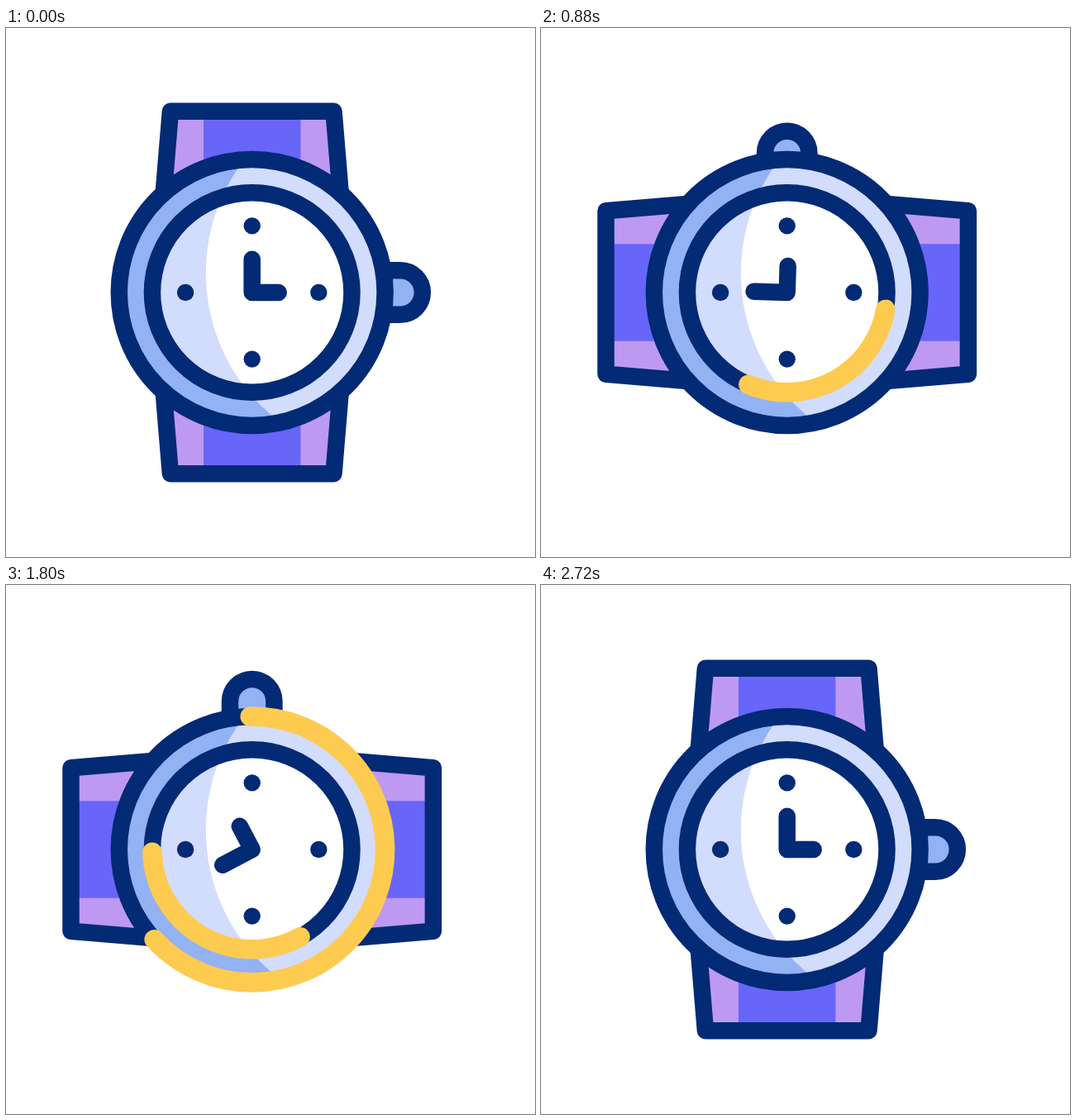
An HTML page with a canvas that plays this animation: 640 by 640 pixels, repeating every 3000 ms.

```html
<!DOCTYPE html>
<html>
<head>
<meta charset="utf-8">
<title>Watch</title>
<style>
html, body { margin: 0; height: 100%; overflow: hidden; background: #fff; }
canvas { display: block; width: 100%; height: 100%; }
</style>
</head>
<body>
<canvas width="640" height="640"></canvas>
<script>
const ctx = document.querySelector('canvas').getContext('2d');
const LOOP = 3000, LINE = 20.5;
const NAVY = '#032a75', BLUE = '#93b2f4', PALE = '#d2dcfd';
const VIOLET = '#bd99f2', INDIGO = '#6865f9', YELLOW = '#fecb51';
const RAD = Math.PI / 180;

// Sweep of one ring highlight: time, tail and head in degrees past 3 o'clock
const SWEEP = [
  [700, 0, 0], [880, 9.5, 112], [1260, 145.7, 428.4],
  [1560, 300, 508], [1780, 409.2, 537.2], [2020, 540, 540]
];

const clamp = u => Math.min(1, Math.max(0, u));
const smooth = (t, from, to) => {
  const u = clamp((t - from) / (to - from));
  return u * u * (3 - 2 * u);
};

// cubic-bezier(.38, 0, .19, 1)
function swing(t, from) {
  const u = clamp((t - from) / 600);
  let lo = 0, hi = 1;
  for (let i = 0; i < 24; i++) {
    const s = (lo + hi) / 2, q = 1 - s;
    if (1.14 * s * q * q + 0.57 * s * s * q + s * s * s < u) lo = s; else hi = s;
  }
  return lo * lo * (3 - 2 * lo);
}

// Cubic through the sweep points, at rest at both ends
function sweepAt(t, col) {
  const slope = i => {
    const a = SWEEP[i - 1], b = SWEEP[i + 1];
    return a && b ? (b[col] - a[col]) / (b[0] - a[0]) : 0;
  };
  const i = SWEEP.findIndex(p => p[0] > t) - 1;
  const [a, b] = [SWEEP[i], SWEEP[i + 1]];
  const d = b[0] - a[0], u = (t - a[0]) / d, q = 1 - u;
  return a[col] * q * q * (1 + 2 * u) + b[col] * u * u * (3 - 2 * u)
    + d * u * q * (q * slope(i) - u * slope(i + 1));
}

function circle(x, y, r) {
  ctx.beginPath();
  ctx.arc(x, y, r, 0, 7);
}

function fill(color) {
  ctx.fillStyle = color;
  ctx.fill();
}

function stroke(color = NAVY, width = LINE) {
  ctx.strokeStyle = color;
  ctx.lineWidth = width;
  ctx.stroke();
}

function strap(side) {
  ctx.save();
  ctx.scale(1, side);
  ctx.beginPath();
  ctx.moveTo(-111.2, -70);
  ctx.lineTo(-98.8, -219.2);
  ctx.lineTo(98.8, -219.2);
  ctx.lineTo(111.2, -70);
  fill(VIOLET);
  ctx.fillStyle = INDIGO;
  ctx.fillRect(-58.7, -219, 117.4, 149);
  stroke();
  ctx.restore();
}

function crown(press) {
  const x = 179.4 - press;
  ctx.beginPath();
  ctx.moveTo(130, -26.7);
  ctx.arc(x, 0, 26.7, -Math.PI / 2, Math.PI / 2);
  ctx.lineTo(130, 26.7);
  fill(BLUE);
  stroke();
}

function disc(r, shade, light) {
  ctx.save();
  circle(0, 0, r);
  ctx.clip();
  fill(shade);
  circle(170.4, -23.6, 226.3);
  fill(light);
  ctx.restore();
  circle(0, 0, r);
  stroke();
}

function hands(angle) {
  for (let i = 0; i < 4; i++) {
    circle(80.6 * Math.cos(i * Math.PI / 2), 80.6 * Math.sin(i * Math.PI / 2), 10.2);
    fill(NAVY);
  }
  ctx.rotate(angle);
  ctx.beginPath();
  ctx.moveTo(0, -40.2);
  ctx.lineTo(0, 0);
  ctx.lineTo(32, 0);
  stroke();
}

function highlight(t, r) {
  if (t <= SWEEP[0][0] || t >= SWEEP[SWEEP.length - 1][0]) return;
  const tail = sweepAt(t, 1), head = sweepAt(t, 2);
  if (head <= tail) return;
  ctx.beginPath();
  ctx.arc(0, 0, r, tail * RAD, head * RAD);
  stroke(YELLOW, 23.6);
}

function turned(angle, draw) {
  ctx.save();
  ctx.rotate(angle);
  draw();
  ctx.restore();
}

function draw(t) {
  const turn = -90 * RAD * (swing(t, 0) - swing(t, 2100));
  const press = 12.7 * (smooth(t, 633, 833) - smooth(t, 833, 1033)
    + smooth(t, 1867, 2067) - smooth(t, 2067, 2267));

  ctx.setTransform(1, 0, 0, 1, 0, 0);
  ctx.fillStyle = '#fff';
  ctx.fillRect(0, 0, 640, 640);
  ctx.translate(297.7, 320);
  ctx.lineCap = ctx.lineJoin = 'round';

  turned(turn, () => {
    strap(1);
    strap(-1);
    crown(press);
  });
  disc(160.9, BLUE, PALE);
  disc(120.8, PALE, '#fff');
  turned(turn, () => hands(360 * RAD * smooth(t, 833, 2000)));
  highlight(t, 120.8);
  highlight(t - 300, 160.9);
}

const start = performance.now();
function frame() {
  draw((performance.now() - start) % LOOP);
  requestAnimationFrame(frame);
}
frame();
</script>
</body>
</html>
```
